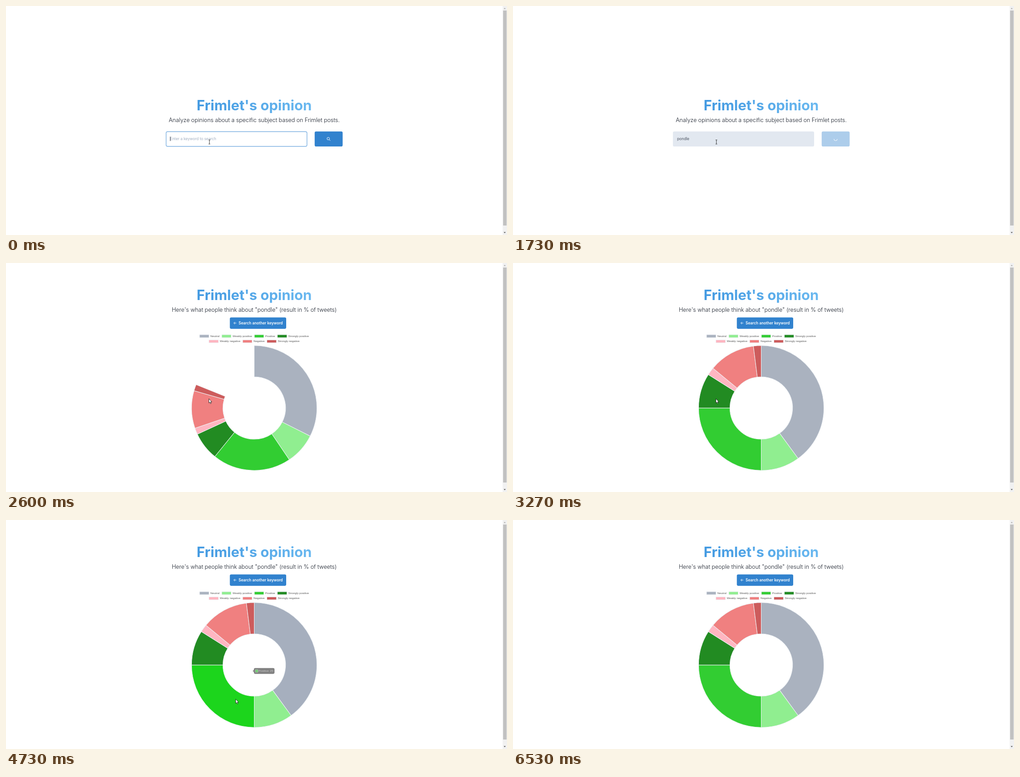
Animation of 1105 by 507 pixels, one loop 7190 ms. Source, as an HTML page with a canvas:

```html
<!DOCTYPE html>
<html lang="en">
<head>
<meta charset="utf-8">
<title>Opinion search</title>
<style>
  html, body { margin: 0; width: 100%; height: 100%; overflow: hidden; background: #fff; }
  canvas { display: block; width: 1105px; height: 507px; }
</style>
</head>
<body>
<canvas id="stage"></canvas>
<script>
const W = 1105, H = 507, LOOP = 7190, STEP = 200 / 3;
const S = 0.518; // page zoom
const MID = 547.5, CY = 321, R = 138.2, HOLE = R / 2;
const UI = 'Inter, sans-serif';
const CHART_FONT = `${12 * S}px "Liberation Sans", Arial, sans-serif`;
const BRAND = 'Frimlet', WORD = 'pondle';

const KEYS = [330, 400, 600, 670, 730, 870];
const CARET_OFF = 1400, LOAD = 1440, RESULT = 2130, LEGEND = 2200, CHART = 2256;

const SLICES = [
  { label: 'Neutral', value: 40, color: '#aab2bf', hover: '#8f9eb7' },
  { label: 'Weakly positive', value: 10, color: '#90ee90' },
  { label: 'Positive', value: 25, color: '#32cd32', hover: '#0adb0a' },
  { label: 'Strongly positive', value: 9, color: '#228b22', hover: '#079507' },
  { label: 'Weakly negative', value: 2, color: '#ffb6c1' },
  { label: 'Negative', value: 12, color: '#f08080' },
  { label: 'Strongly negative', value: 2, color: '#cd5c5c' }
];

// time and hovered slice (-1 for none)
const HOVERS = [[3590, 3], [3720, -1], [4005, 0], [4370, -1], [4645, 2], [5700, -1]];

// time, x, y of the pointer
const PATH = [
  [3560, 447.5, 300.5], [3800, 500, 300], [4050, 640, 305], [4250, 645, 318],
  [4400, 600, 350], [4600, 530, 385], [4730, 506.5, 396.5], [5490, 506.5, 396.5],
  [5650, 460, 402], [5800, 370, 417], [6200, 66, 476], [6530, 49, 508]
];

const canvas = document.getElementById('stage');
const ctx = canvas.getContext('2d');
const dpr = window.devicePixelRatio || 1;
canvas.width = W * dpr;
canvas.height = H * dpr;

const clamp = v => Math.max(0, Math.min(1, v));
const lerp = (a, b, u) => a + (b - a) * u;
const outQuart = u => 1 - Math.pow(1 - clamp(u), 4);

function mix(a, b, u) {
  const part = (hex, i) => parseInt(hex.slice(i, i + 2), 16);
  return `rgb(${[1, 3, 5].map(i => Math.round(lerp(part(a, i), part(b, i), u)))})`;
}

function text(str, x, y, font, color, align = 'left') {
  ctx.font = font;
  ctx.fillStyle = color;
  ctx.textAlign = align;
  ctx.fillText(str, x, y);
}

function box(x, y, w, h, r, fill) {
  ctx.beginPath();
  ctx.roundRect(x, y, w, h, r);
  ctx.fillStyle = fill;
  ctx.fill();
}

function line(points, color, width, close) {
  ctx.beginPath();
  points.forEach(([x, y]) => ctx.lineTo(x, y));
  if (close) ctx.closePath();
  ctx.strokeStyle = color;
  ctx.lineWidth = width;
  ctx.stroke();
}

function shape(points, fill) {
  ctx.beginPath();
  points.forEach(([x, y]) => ctx.lineTo(x, y));
  ctx.fillStyle = fill;
  ctx.fill();
}

function drawScrollbar() {
  box(1095.5, 0, 9.5, H, 0, '#f1f1f1');
  box(1096.4, 10, 7.7, 476, 0, '#c1c1c1');
  shape([[1098, 6.5], [1100, 4], [1102, 6.5]], '#a3a3a3');
  shape([[1097.7, 500.5], [1100, 503], [1102.3, 500.5]], '#505050');
}

function drawHead(y, sub) {
  const g = ctx.createLinearGradient(422, 0, 674, 0);
  g.addColorStop(0, '#4299e1');
  g.addColorStop(1, '#6bb9f0');
  text(`${BRAND}'s opinion`, MID, y, `700 ${60 * S}px ${UI}`, g, 'center');
  text(sub, MID, y + 25.7, `300 ${24 * S}px ${UI}`, '#1a202c', 'center');
}

function drawSearch(t) {
  drawHead(230.8, `Analyze opinions about a specific subject based on ${BRAND} posts.`);
  const font = `400 ${16 * S}px ${UI}`;
  const load = clamp((t - LOAD) / 200);

  box(352.7, 277.8, 311.4, 33.2, 3.1, mix('#ffffff', '#e2e8f0', load));
  if (load < 1) {
    ctx.beginPath();
    ctx.roundRect(353.2, 278.2, 310.6, 32.5, 3);
    ctx.strokeStyle = mix('#7eb1e2', '#e2e8f0', load);
    ctx.lineWidth = 1.4;
    ctx.stroke();
  }

  const typed = WORD.slice(0, KEYS.filter(k => t >= k).length);
  if (typed) text(typed, 362, 297.4, font, mix('#2d3748', '#4b5260', load));
  else text('Enter a keyword to search', 362, 297.4, font, '#a0aec0');
  if (t < 130 || (t >= KEYS[0] && t < CARET_OFF)) {
    ctx.font = font;
    const caret = typed ? ctx.measureText(typed).width : 0;
    box(361.8 + caret, 289.3, 0.9, 9.7, 0, '#1a202c');
  }

  box(680.8, 277.8, 61.7, 33.2, 3.1, mix('#3182ce', '#adcdeb', load));
  ctx.strokeStyle = '#fff';
  ctx.lineWidth = 1;
  ctx.beginPath();
  if (t < LOAD) {
    ctx.arc(710.8, 293.6, 2.8, 0, Math.PI * 2);
    ctx.moveTo(712.8, 295.6);
    ctx.lineTo(715.4, 298.3);
  } else {
    const a = (t - 1490) / 650 * Math.PI * 2 - Math.PI * 0.75;
    ctx.arc(711.6, 294.5, 3.7, a, a + Math.PI);
  }
  ctx.stroke();

  line([[446.7, 296.5], [450.5, 296.5]], '#222', 0.8);
  line([[448.6, 296.5], [448.6, 305.7]], '#222', 0.9);
  line([[446.7, 305.7], [450.5, 305.7]], '#222', 0.8);
}

function drawLegend() {
  const bw = 40 * S, pad = 6 * S, gap = 10 * S;
  ctx.font = CHART_FONT;
  [[SLICES.slice(0, 4), 162], [SLICES.slice(4), 173.4]].forEach(([row, y]) => {
    const widths = row.map(s => bw + pad + ctx.measureText(s.label).width);
    let x = MID - (widths.reduce((a, b) => a + b) + gap * (row.length - 1)) / 2;
    row.forEach((s, i) => {
      box(x, y - 3.1, bw, 6.2, 0, s.color);
      ctx.strokeStyle = '#e8ecf1';
      ctx.lineWidth = 0.8;
      ctx.strokeRect(x, y - 3.1, bw, 6.2);
      text(s.label, x + bw + pad, y + 2, CHART_FONT, '#555');
      x += widths[i] + gap;
    });
  });
}

function hoverAmount(i, t) {
  let from = 0, goal = 0, start = 0;
  const at = now => lerp(from, goal, outQuart((now - start) / (goal ? 500 : 1000)));
  for (const [time, id] of HOVERS) {
    const next = id === i ? 1 : 0;
    if (time > t || next === goal) continue;
    from = at(time);
    goal = next;
    start = time;
  }
  return at(t);
}

function drawRing(t) {
  const turn = outQuart((t - CHART) / 1020) * Math.PI * 2;
  let a = -Math.PI / 2;
  SLICES.forEach((s, i) => {
    const b = a + turn * s.value / 100;
    ctx.beginPath();
    ctx.arc(MID, CY, R, a, b);
    ctx.arc(MID, CY, HOLE, b, a, true);
    ctx.closePath();
    ctx.fillStyle = s.hover ? mix(s.color, s.hover, hoverAmount(i, t)) : s.color;
    ctx.fill();
    ctx.strokeStyle = '#eef2f5';
    ctx.lineWidth = 2 * S;
    ctx.lineJoin = 'bevel';
    ctx.stroke();
    a = b;
  });
}

function tipPlace(id) {
  const before = SLICES.slice(0, id).reduce((sum, s) => sum + s.value, 0);
  const a = (before + SLICES[id].value / 2) / 50 * Math.PI - Math.PI / 2;
  const r = (R + HOLE) / 2;
  const label = `${SLICES[id].label}: ${SLICES[id].value}`;
  ctx.font = CHART_FONT;
  const w = 26 * S + ctx.measureText(label).width;
  const px = MID + Math.cos(a) * r;
  const left = px <= MID;
  return { id, label, w, left, x: left ? px + 3.6 : px - 3.6 - w, y: CY + Math.sin(a) * r };
}

function drawTooltip(t) {
  let tip = null, from = null, start = 0, shown = false, fadeFrom = 0, fadeStart = 0;
  const place = now => {
    const u = outQuart((now - start) / 700);
    return { x: lerp(from.x, tip.x, u), y: lerp(from.y, tip.y, u) };
  };
  const alpha = now => {
    const d = (now - fadeStart) / 150;
    return clamp(shown ? fadeFrom + d : fadeFrom - d);
  };
  for (const [time, id] of HOVERS) {
    if (time > t) break;
    fadeFrom = alpha(time);
    fadeStart = time;
    shown = id >= 0;
    if (!shown) continue;
    const next = tipPlace(id);
    from = tip ? place(time) : next;
    tip = next;
    start = time;
  }
  if (!tip || !alpha(t)) return;

  const { x, y } = place(t), h = 25 * S;
  const edge = tip.left ? x : x + tip.w, dir = tip.left ? -1 : 1;
  ctx.save();
  ctx.globalAlpha = alpha(t);
  ctx.fillStyle = 'rgba(0,0,0,.8)';
  ctx.beginPath();
  ctx.roundRect(x, y - h / 2, tip.w, h, 3.1);
  ctx.fill();
  shape([[edge, y - 2.6], [edge + dir * 2.6, y], [edge, y + 2.6]], 'rgba(0,0,0,.8)');
  box(x + 3.1, y - 3.1, 6.2, 6.2, 0, '#fff');
  box(x + 3.6, y - 2.6, 5.2, 5.2, 0, SLICES[tip.id].color);
  text(tip.label, x + 10.4, y + 2.2, CHART_FONT, '#fff');
  ctx.restore();
}

function drawPointer(t) {
  const last = PATH[PATH.length - 1];
  if (t >= last[0]) return;
  let [, x, y] = PATH[0];
  for (let i = 1; i < PATH.length; i++) {
    const [t0, x0, y0] = PATH[i - 1], [t1, x1, y1] = PATH[i];
    if (t < t0) break;
    const u = clamp((t - t0) / (t1 - t0));
    x = lerp(x0, x1, u);
    y = lerp(y0, y1, u);
  }
  const arrow = [[0, 0], [0, 9.4], [2.1, 7.5], [3.6, 10.9], [5.1, 10.3], [3.7, 7], [6.5, 7]]
    .map(([dx, dy]) => [x + dx, y + dy]);
  shape(arrow, '#fff');
  ctx.lineJoin = 'miter';
  line(arrow, '#111', 0.8, true);
}

function drawResult(t) {
  drawHead(82.3, `Here's what people think about "${WORD}" (result in % of tweets)`);
  box(493.7, 120.4, 124.3, 25.3, 3.1, '#3182ce');
  line([[508, 133], [502.6, 133]], '#fff', 0.9);
  line([[505, 130.4], [502.4, 133], [505, 135.6]], '#fff', 0.9);
  text('Search another keyword', 513, 136.4, `600 ${16 * S}px ${UI}`, '#fff');
  if (t >= LEGEND) drawLegend();
  if (t >= CHART) drawRing(t);
  drawTooltip(t);
  drawPointer(t);
}

let origin = null;
function frame(now) {
  if (origin === null) origin = now;
  const t = Math.floor(((now - origin) % LOOP + 3.4) / STEP) * STEP + 3.4;
  ctx.setTransform(dpr, 0, 0, dpr, 0, 0);
  ctx.fillStyle = '#fff';
  ctx.fillRect(0, 0, W, H);
  if (t < RESULT) drawSearch(t);
  else drawResult(t);
  drawScrollbar();
  requestAnimationFrame(frame);
}
requestAnimationFrame(frame);
</script>
</body>
</html>
```
